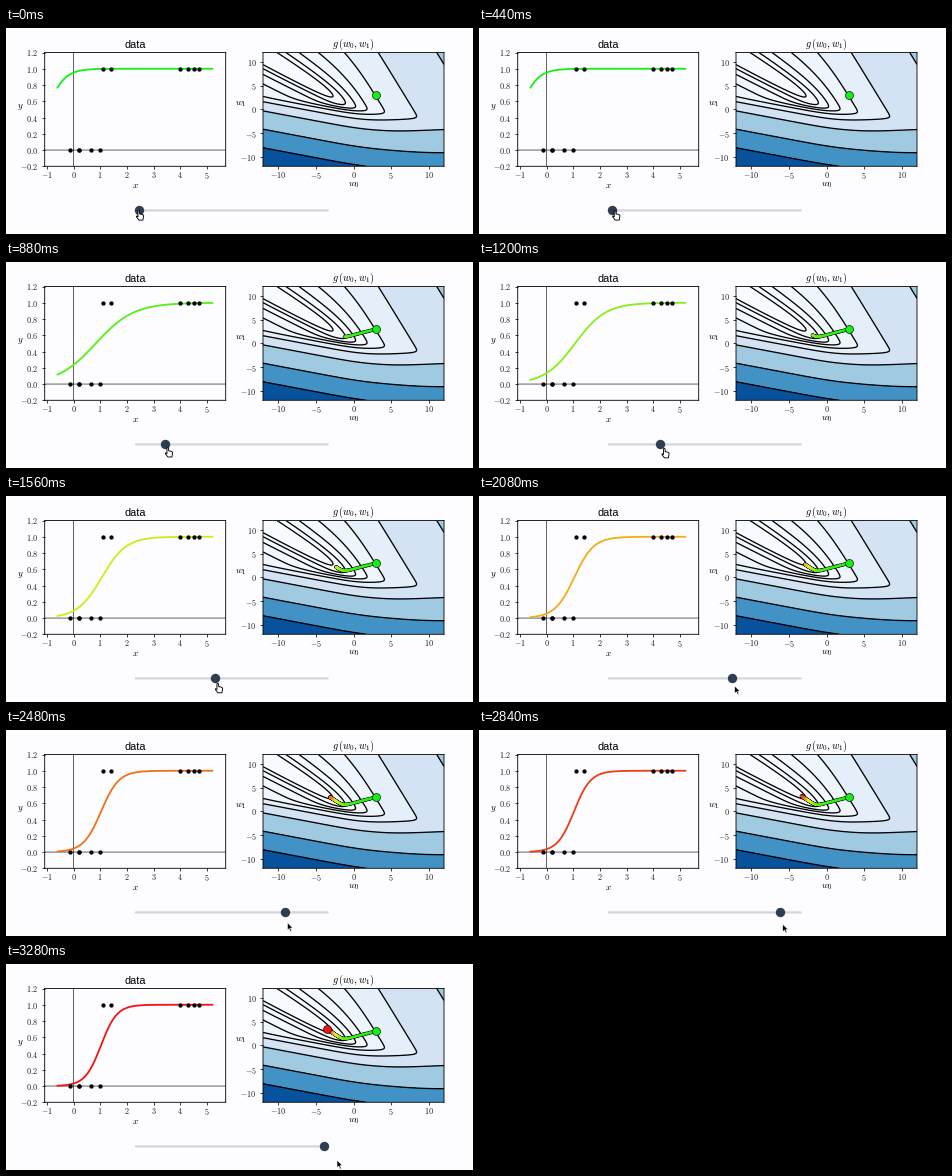
Animation, 467 px wide and 206 px high, one loop 3.32 s. Source, as a matplotlib script:

```python
import numpy as np
import matplotlib.pyplot as plt
from matplotlib.animation import FuncAnimation
from matplotlib.collections import LineCollection
from matplotlib.patches import Polygon

W, H, DPI = 467, 206, 100
FRAMES, STEP_MS = 83, 40
PX = 72 / DPI  # points per pixel
STEPS = 100
KNOB_MIN, KNOB_MAX, KNOB_Y = 133.2, 318, 182.4
PAPER = "#fdfcff"

plt.rcParams.update({"mathtext.fontset": "cm", "font.family": "Liberation Sans"})

# Two-class data
neg = np.array([-0.12, 0.2, 0.2, 0.64, 1.0])
pos = np.array([1.1, 1.4, 4.0, 4.3, 4.5, 4.7])
x = np.concatenate([neg, pos])
y = np.concatenate([np.zeros(len(neg)), np.ones(len(pos))])


def sigmoid(t):
    return 1 / (1 + np.exp(-t))


def cost(w0, w1):
    return sum(np.logaddexp(0, (1 - 2 * b) * (w0 + w1 * a)) for a, b in zip(x, y)) / len(x)


def descend(w, steps, rate=1.0):
    path = [np.array(w, float)]
    for _ in range(steps):
        w0, w1 = path[-1]
        err = sigmoid(w0 + w1 * x) - y
        path.append(path[-1] - rate * np.array([err.mean(), (err * x).mean()]))
    return np.array(path)


def step_color(p):
    """Green through yellow to red, slightly muted."""
    return tuple(0.08 + 0.86 * c for c in (min(1, 2 * p), min(1, 2 * (1 - p)), 0))


def contour_levels(g, halvings=7):
    low, high = g.min(), g.max()
    cut = (high - low) / 2
    levels = [cut, (cut + high) / 2, high]
    for _ in range(halvings):
        cut = (low + cut) / 2
        levels.insert(0, cut)
    return [low] + levels


path = descend((3, 3), STEPS)
colors = [step_color(p) for p in np.linspace(0, 1, STEPS + 1)]
segments = np.stack([path[:-1], path[1:]], axis=1)

fig = plt.figure(figsize=(W / DPI, H / DPI), dpi=DPI, facecolor=PAPER)


def panel(left, right, xlim, ylim, xticks, yticks, yfmt):
    top, bottom = 24.5, 138.3
    ax = fig.add_axes([left / W, 1 - bottom / H, (right - left) / W, (bottom - top) / H],
                      facecolor=PAPER)
    ax.set(xlim=xlim, ylim=ylim)
    ax.set_xticks(xticks, [f"${v}$" for v in xticks])
    ax.set_yticks(yticks, [f"${v:{yfmt}}$" for v in yticks])
    ax.tick_params(labelsize=8.2 * PX, length=3 * PX, width=0.75 * PX, labelcolor="#222222")
    ax.tick_params(axis="x", pad=0.9 * PX)
    ax.tick_params(axis="y", pad=3.5 * PX)
    for s in ax.spines.values():
        s.set_linewidth(0.85 * PX)
        s.set_snap(False)
    return ax


def label(px, py, s, size):
    fig.text(px / W, 1 - py / H, s, fontsize=size * PX, ha="center", va="center")


fit = panel(38.7, 219.7, (-1.08, 5.7), (-0.2, 1.2), range(-1, 6),
            np.round(np.arange(-0.2, 1.3, 0.2), 1) + 0.0, ".1f")
surf = panel(257, 438, (-12, 12), (-12, 12), range(-10, 11, 5), range(-10, 11, 5), "d")

label(129, 16.5, "data", 10.9)
label(347.2, 16.2, r"$g\,(w_0,w_1)$", 10.2)
label(129, 157, "$x$", 9.2)
label(14, 78.8, "$y$", 9.2)
label(347.7, 157.3, "$w_0$", 9.4)
label(235, 76.2, "$w_1$", 9.4)

# Left panel
for line in (fit.axhline, fit.axvline):
    line(0, color="black", lw=0.6 * PX, zorder=1, snap=False)
fit.plot(x, y, "o", color="black", ms=4.3 * PX, mew=0, zorder=4)
xs = np.linspace(-0.6, 5.2, 200)
curve, = fit.plot([], [], lw=1.8 * PX, zorder=3)

# Right panel
grid = np.linspace(-12, 12, 300)
A, B = np.meshgrid(grid, grid)
G = cost(A, B)
levels = contour_levels(G)
surf.contourf(A, B, G, levels=levels, cmap="Blues")
surf.contour(A, B, G, levels=levels, colors="black", linewidths=1.3 * PX)
trail_edge = LineCollection([], colors="black", linewidths=3.7 * PX, zorder=4, capstyle="round")
trail = LineCollection([], linewidths=2.6 * PX, zorder=5, capstyle="round")
surf.add_collection(trail_edge, autolim=False)
surf.add_collection(trail, autolim=False)


def dot(w, color):
    return surf.plot(*w, "o", color=color, mec="black", mew=0.6 * PX, ms=8 * PX, zorder=6)[0]


dot(path[0], colors[0])
goal = dot(path[-1], colors[-1])

# Slider and pointer, in pixels from the top left
ui = fig.add_axes([0, 0, 1, 1])
ui.set(xlim=(0, W), ylim=(H, 0))
ui.axis("off")
ui.patch.set_visible(False)
ui.plot([129.8, 321.8], [KNOB_Y, KNOB_Y], color="#d3d6da", lw=2.2 * PX,
        solid_capstyle="round", snap=False, zorder=1)
knob, = ui.plot([], [], "o", color="#2c3e50", ms=9.4 * PX, mew=0, snap=False, zorder=2)

ARROW = np.array([(0, 0), (0, 7.6), (1.8, 6), (3.1, 9), (4.4, 8.4), (3.1, 5.5), (5.4, 5.3)])
HAND = np.array([(1.6, 0.4), (2.5, 0), (3.3, 0.6), (3.4, 3.3), (5.2, 3.5), (6.9, 4.2),
                 (7.3, 5.4), (6.6, 9.4), (2.6, 9.4), (0.2, 6.3), (0.2, 5.3), (1.7, 6)]) - (1.7, 0)


def pointer(face, edge, lw):
    p = Polygon(ARROW, closed=True, fc=face, ec=edge, lw=lw * PX, joinstyle="round", zorder=3)
    return ui.add_patch(p)


arrow = pointer("black", "white", 0.6)
hand = pointer("white", "black", 0.9)

KEY_T = [0, 440, 520, 880, 1560, 2080, 2480, 3280]
KEY_X = [132.0, 135.3, 135.6, 161.0, 211.0, 255.6, 281.4, 331.0]
KEY_Y = [182.7, 182.7, 183.0, 185.6, 187.4, 189.9, 192.6, 196.1]
HAND_UNTIL = 1720


def update(i):
    t = i * STEP_MS
    px, py = np.interp(t, KEY_T, KEY_X), np.interp(t, KEY_T, KEY_Y)
    s = np.clip((px - 2.4 - KNOB_MIN) / (KNOB_MAX - KNOB_MIN), 0, 1)
    k = int(round(s * STEPS))

    w0, w1 = path[k]
    curve.set_data(xs, sigmoid(w0 + w1 * xs))
    curve.set_color(colors[k])
    trail_edge.set_segments(segments[:k])
    trail.set_segments(segments[:k])
    trail.set_color(colors[1:k + 1] or "none")
    goal.set_visible(k == STEPS)

    knob.set_data([KNOB_MIN + (KNOB_MAX - KNOB_MIN) * k / STEPS], [KNOB_Y])
    dragging = t < HAND_UNTIL
    hand.set_visible(dragging)
    arrow.set_visible(not dragging)
    hand.set_xy(HAND + (px, py))
    arrow.set_xy(ARROW + (px, py))
    return curve, trail_edge, trail, goal, knob, hand, arrow


anim = FuncAnimation(fig, update, frames=FRAMES, interval=STEP_MS, repeat=True, repeat_delay=0)
plt.show()
```
